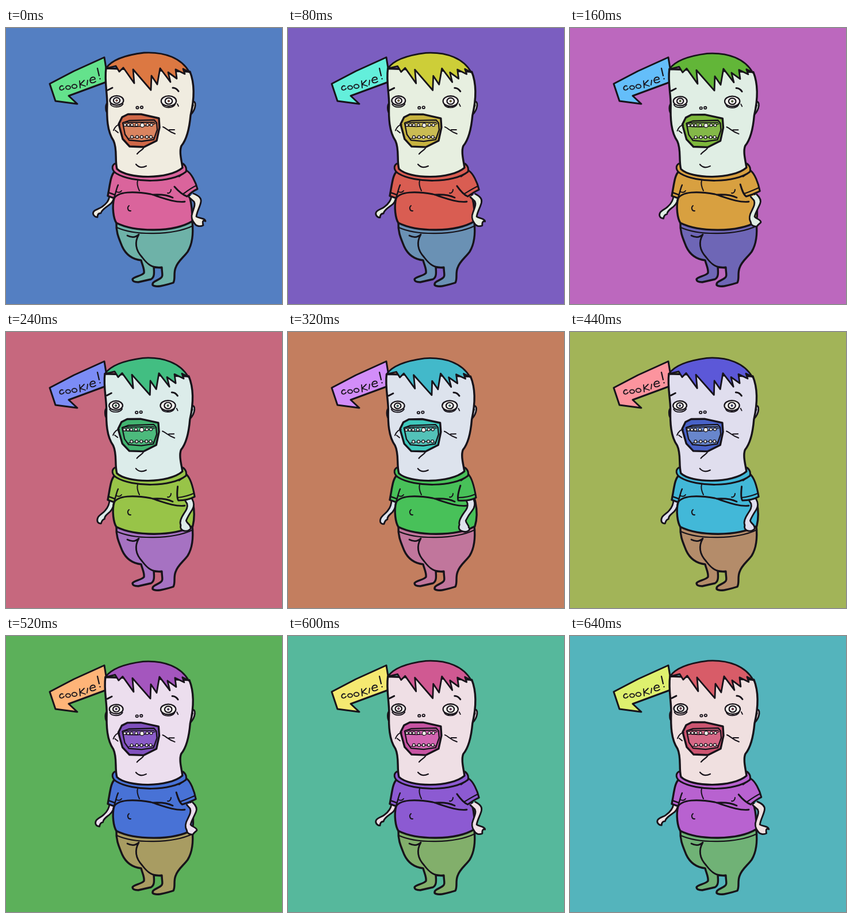
Recreate the animation shown at these times as an HTML page with a canvas. Size 480 by 480 pixels, loop 0.68 s.

```html
<!DOCTYPE html>
<html lang="en">
<head>
<meta charset="utf-8">
<title>Cookie!</title>
<style>
html, body { margin: 0; width: 100%; height: 100%; overflow: hidden; }
canvas { display: block; width: 100vw; height: 100vh; }
</style>
</head>
<body>
<canvas id="stage" width="480" height="480" role="img" aria-label="cookie!"></canvas>
<script>
const ctx = document.getElementById('stage').getContext('2d');
const STEP = 40, STEPS = 17, INK = '#17131a';

// Hue cycle: every palette has one colour per key step, then wraps around.
const keySteps = [0, 4, 6, 9, 11, 13, 16, 17];
const palettes = {
  back:   '547fc2 bc68be c6687e c2965a a2b458 5cb05a 54b4bc',
  bubble: '64e28c 64befa 7c8cf6 fa96f8 fc949e feb478 def06e',
  hair:   'dc7842 62b638 42be82 4292d0 5c58d8 a456be d85c68',
  skin:   'f0ece0 e0eee4 dcecea dedeee e0deee ecdeee f0e0e0',
  lips:   'd06848 7eb83c 42b470 3eb8d0 4862c8 8050be cc5470',
  mouth:  'da8460 84b848 4cba7c 56b6c6 6886cc 8a5cc8 d66886',
  shirt:  'da649c d8a040 98c448 48c088 42b8d8 4872d6 b862d0',
  pants:  '6eb2a8 6e66b6 a672c2 c0787e b48c6a a89c62 70b276'
};

function toHsl(hex) {
  const [r, g, b] = hex.match(/../g).map(v => parseInt(v, 16) / 255);
  const max = Math.max(r, g, b), min = Math.min(r, g, b), d = max - min;
  const l = (max + min) / 2;
  const s = d ? d / (1 - Math.abs(2 * l - 1)) : 0;
  let h = 0;
  if (d) {
    if (max === r) h = (g - b) / d;
    else if (max === g) h = 2 + (b - r) / d;
    else h = 4 + (r - g) / d;
  }
  return [(h * 60 + 360) % 360, s * 100, l * 100];
}

for (const name in palettes) {
  const list = palettes[name].split(' ').map(toHsl);
  palettes[name] = [...list, list[0]];
}

const lerp = (a, b, t) => a + (b - a) * t;

function colourAt(list, step) {
  let i = 0;
  while (step >= keySteps[i + 1]) i++;
  const t = (step - keySteps[i]) / (keySteps[i + 1] - keySteps[i]);
  const [a, b] = [list[i], list[i + 1]];
  const turn = (b[0] - a[0] + 540) % 360 - 180;
  return `hsl(${a[0] + turn * t}, ${lerp(a[1], b[1], t)}%, ${lerp(a[2], b[2], t)}%)`;
}

// Blends two paths that share the same commands.
function blend(a, b, t) {
  const ends = b.match(/\d+/g);
  let i = 0;
  return a.replace(/\d+/g, n => lerp(+n, +ends[i++], t).toFixed(2));
}

function shape(d, fill, width = 3.4) {
  const path = new Path2D(d);
  if (fill) {
    ctx.fillStyle = fill;
    ctx.fill(path);
  }
  if (width) {
    ctx.lineWidth = width;
    ctx.stroke(path);
  }
}

const line = (d, width = 2) => shape(d, null, width);

function oval(x, y, rx, ry, fill, width = 2) {
  ctx.beginPath();
  ctx.ellipse(x, y, rx, ry, 0, 0, Math.PI * 2);
  if (fill) {
    ctx.fillStyle = fill;
    ctx.fill();
  }
  if (width) {
    ctx.lineWidth = width;
    ctx.stroke();
  }
}

const poses = {
  leftArm: [
    'M188 294C187 300 184 305 179 308C172 313 166 317 165 322C160 322 159 325 159 329C154 329 150 324 152 320C155 315 162 315 167 311C174 306 179 301 180 292',
    'M188 295C188 303 185 309 182 313C177 318 172 321 173 326C169 327 168 331 167 334C160 334 159 329 162 323C165 318 171 315 174 310C179 304 180 299 180 292'
  ],
  rightArm: [
    'M326 288C334 291 340 296 339 302C338 310 332 319 331 328C335 331 346 330 347 336C343 334 341 335 343 343C338 346 331 345 328 340C323 334 322 327 324 322C326 314 330 308 327 302L318 294',
    'M323 291C326 299 325 305 320 311C315 317 311 324 309 328C309 333 315 336 314 340C319 344 311 349 304 347C298 346 295 341 298 335C296 330 301 321 306 314C311 308 313 304 312 298L310 293'
  ],
  sleeve: [
    'M301 258L314 248C322 252 330 268 333 280C326 283 320 288 315 293C307 290 300 284 293 276',
    'M301 258L314 248C320 254 324 270 327 288C320 292 308 294 296 293C294 288 297 276 300 267'
  ],
  hem: [
    'M331 274C324 277 317 282 309 288',
    'M326 282C319 285 308 288 296 288'
  ],
  shirt: [
    'M190 249C182 254 181 272 177 292L188 296C184 311 187 332 192 339C224 355 291 356 324 336C324 321 323 307 320 296L314 248Z',
    'M190 249C182 254 181 272 177 292L188 296C184 311 187 332 192 339C224 355 291 356 325 338C329 325 329 310 326 296L314 248Z'
  ]
};

function drawBubble(c) {
  shape('M76 97L118 75L171 51L175 76L174 94L109 118L124 132L86 127Z', c.bubble, 3);
  line('M99 101C95 99 92 104 94 107C97 109 100 107 101 105', 1.8);
  oval(108, 103.5, 4, 3.2, null, 1.8);
  oval(119, 101.5, 4.4, 3.4, null, 1.8);
  line('M128 92L129 104M136 91L129 98L138 101M142 91L141 99', 1.8);
  line('M147 91L155 89C155 83 147 85 146 91C147 97 152 96 156 93', 1.8);
  line('M159 70L162 83M163.5 88L163.6 88.4', 2.2);
}

function drawLegs(c) {
  shape('M192 338C191 356 197 367 202 380C208 393 218 402 235 404C237 412 241 419 240 426C235 432 222 432 220 437C220 441 224 442 230 442L252 437C258 434 258 427 257 416L271 417C271 426 274 432 269 435C262 440 254 441 255 447C260 452 275 448 291 443C295 436 291 426 295 417C299 405 308 400 316 389C324 376 326 357 324 337Z', c.pants);
  line('M193 347C223 361 290 361 325 344', 2.4);
  line('M211 361C219 365 226 364 231 359C223 373 225 386 237 399C246 411 254 418 271 416', 2.8);
}

function drawBody(c, swing) {
  const pose = name => blend(...poses[name], swing);
  shape(pose('leftArm'), c.skin, 2.8);
  shape(pose('shirt'), c.shirt);
  line('M195 273C192 279 191 287 188 295M178 286L189 290', 2.4);
  line('M187 299C192 283 224 284 252 289C274 296 294 304 311 302M255 290C270 289 282 291 290 295', 2.8);
  line('M229 265C227 272 230 279 232 283M191 284C195 287 199 286 201 283M281 287C284 288 287 285 287 281');
  line('M214 309C210 312 212 319 217 318');
  shape(pose('rightArm'), c.skin, 2.8);
  shape(pose('sleeve'), c.shirt, 3);
  line(pose('hem'), 2.2);
  shape('M189 236C183 240 184 248 192 253C220 270 288 270 313 250C315 242 310 236 305 235Z', c.shirt, 3);
}

function drawEye(x, y, size, c) {
  oval(x, y, 12.5 * size, 8.5 * size, '#f5f3ee', 2.3);
  oval(x, y, 6 * size, 5.2 * size, '#f8f6f2', 2.2);
  oval(x, y, 1.5, 1.5, c.lips, 1);
  line(`M${x - 11} ${y + 6}C${x - 8} ${y + 13} ${x + 7} ${y + 13} ${x + 11} ${y + 6}`, 1.9);
}

function drawMouth(c) {
  shape('M196 167L202 155L212 150L235 150L266 157L267 173L262 196L240 207L215 206L203 193Z', c.lips);
  shape('M203 165L214 161L258 160L262 165L263 177L257 194L236 197L214 195L207 185Z', c.mouth, 2.3);
  line('M205 164L258 164', 1.8);
  line('M205 170C224 173 247 171 260 166M214 192C227 189 245 189 257 191', 1.4);
  for (const x of [207, 213, 219, 227, 246, 253]) oval(x, 168.5, 2.4, 2.4, '#f5f2ec', 1.2);
  oval(237, 169, 3.5, 3.6, '#f5f2ec', 1.2);
  for (const x of [219, 228, 236, 245, 252]) oval(x, 189.5, 2.3, 2.6, '#f5f2ec', 1.2);
}

// The head leans and squashes slightly as the arms swing in.
function drawHead(c, swing) {
  ctx.save();
  ctx.translate(245, 256);
  ctx.rotate(-0.014 * swing);
  ctx.scale(1, 1 - 0.013 * swing);
  ctx.translate(-245, -256);
  shape('M178 130C172 129 172 147 178 149', c.skin, 2.6);
  shape('M323 128C333 125 330 142 321 151', c.skin, 2.8);
  shape('M174 70C171 92 176 112 176 132C175 156 176 180 187 196C194 211 189 230 193 245C211 263 283 264 307 243C305 229 301 215 305 205C315 193 319 174 321 152C325 135 331 104 320 76Z', c.skin);
  shape('M174 70C184 55 207 47 240 43C277 41 306 53 319 77L308 71L311 80L295 72L297 88L282 77L286 94L268 70L263 98L253 83L252 108L221 72L223 96L204 69L197 76L191 66Z', c.hair, 2.8);
  line('M177 108L185 104M290 104C294 104 298 107 300 110', 3);
  line('M298 132L300 136M326 134L323 142', 1.8);
  drawEye(192.5, 126, 0.95, c);
  drawEye(283, 127, 1.05, c);
  oval(228.5, 138.5, 2.2, 2, null, 1.8);
  oval(236, 138, 2.2, 2, null, 1.8);
  drawMouth(c);
  line('M187 178C190 171 194 168 198 168M190 178L195 182M273 172C279 174 282 180 294 184M284 177L293 177', 2);
  line('M228 219C232 214 236 213 239 209M226 237C231 243 238 243 244 240', 2.2);
  ctx.restore();
}

function draw(step) {
  const c = {};
  for (const name in palettes) c[name] = colourAt(palettes[name], step);
  const swing = Math.sin(Math.PI * step / STEPS) ** 2;
  ctx.fillStyle = c.back;
  ctx.fillRect(0, 0, 480, 480);
  ctx.strokeStyle = INK;
  ctx.lineCap = ctx.lineJoin = 'round';
  drawBubble(c);
  drawLegs(c);
  drawBody(c, swing);
  drawHead(c, swing);
}

const start = performance.now();
function tick() {
  draw(Math.floor((performance.now() - start) / STEP) % STEPS);
  requestAnimationFrame(tick);
}
tick();
</script>
</body>
</html>
```
